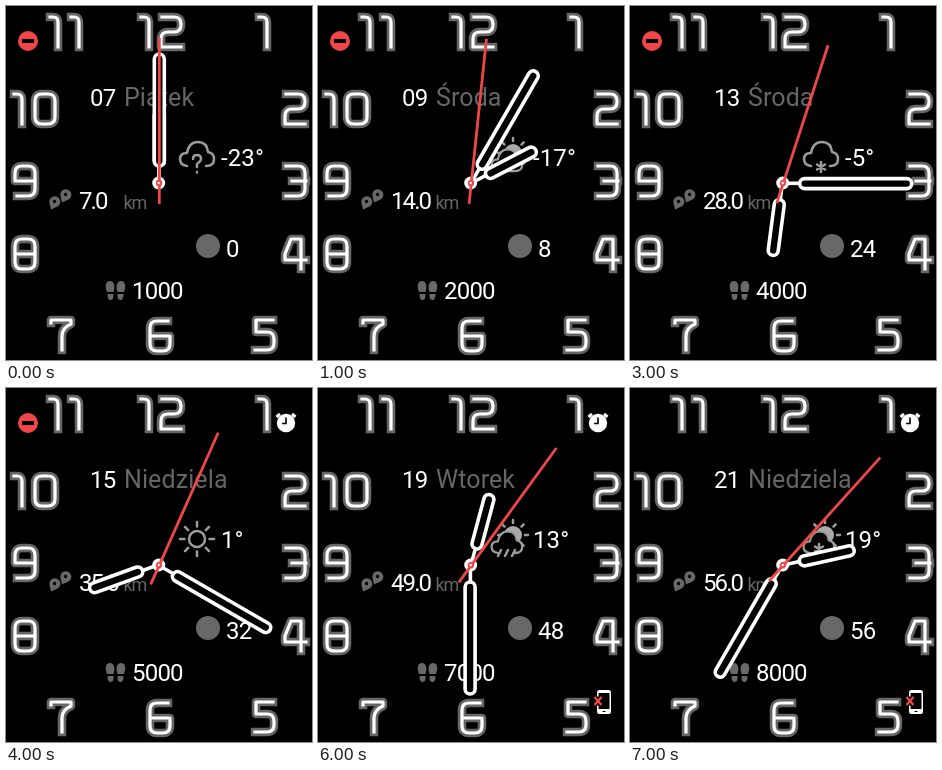
These frames come from a looping animation (306 px wide and 354 px high, 8000 ms). An HTML page:

```html
<!DOCTYPE html>
<html lang="pl">
<head>
<meta charset="utf-8">
<title>Tarcza zegarka</title>
<style>
html, body { margin: 0; width: 100%; height: 100%; overflow: hidden; background: #000; }
svg { display: block; width: 306px; height: 354px; }
text { font-family: Roboto, sans-serif; font-size: 24px; letter-spacing: -.8px; fill: #fff; }
.dim { fill: #666; font-size: 25px; letter-spacing: .1px; }
.line { fill: none; stroke: #9c9c9c; stroke-width: 2.5; stroke-linecap: round; stroke-linejoin: round; }
.hand { fill: #000; stroke: #fff; stroke-width: 3.6; }
</style>
</head>
<body>
<svg viewBox="0 0 306 354">
  <rect width="306" height="354"/>
  <g id="dial" fill="none" stroke-linejoin="round"></g>

  <text id="date" x="84" y="100"></text>
  <text id="day" class="dim" x="118" y="100"></text>
  <g id="sky"></g>
  <text id="temp" x="215" y="160" style="letter-spacing:.1px"></text>
  <text id="dist" x="73" y="203" style="letter-spacing:-1.9px"></text>
  <text class="dim" x="117.5" y="203" style="font-size:18px;letter-spacing:-1.2px">km</text>
  <text id="score" x="220" y="251"></text>
  <text id="steps" x="126" y="293"></text>

  <g fill="#686868">
    <path id="pin" fill-rule="evenodd" d="M56 196.500L54.500 190A5.500 5.500 0 1 1 62.500 193.500ZM59.500 186.800a1.700 1.700 0 1 0 .1 0Z"/>
    <use href="#pin" x="-11" y="7"/>
    <circle cx="202" cy="240" r="12"/>
    <path id="foot" d="M104 275C109 275 109 282 107.500 286H101C99 281 99 275 104 275ZM101.500 288H107.500V291Q107 294 104.500 294Q101.500 294 101.500 288Z"/>
    <use href="#foot" transform="matrix(-1 0 0 1 219 0)"/>
  </g>

  <g id="mute">
    <circle cx="22" cy="35" r="10" fill="#ef4747"/>
    <path d="M16 35H28" stroke="#000" stroke-width="4"/>
  </g>
  <g id="alarm">
    <path d="M270.500 29L274 26M289.500 29L286 26" stroke="#fff" stroke-width="3"/>
    <circle cx="280" cy="35" r="9.200" fill="#fff"/>
    <path d="M280 29.500V35.500H276" fill="none" stroke="#000" stroke-width="1.600"/>
  </g>
  <g id="phone">
    <rect x="279" y="302" width="14" height="24" rx="2.500" fill="#fff"/>
    <path d="M280.500 305H291.500V321H280.500Z"/>
    <path d="M284.500 323.500H287.500" stroke="#000"/>
    <path id="cross" d="M276.500 309L283.500 317M283.500 309L276.500 317" stroke="#000" stroke-width="5"/>
    <path d="M276.500 309L283.500 317M283.500 309L276.500 317" stroke="#ef4747" stroke-width="2.400"/>
  </g>

  <g id="hour"><path class="hand" d="M153 177V160"/><rect class="hand" x="148.300" y="104" width="10" height="56" rx="5"/></g>
  <g id="minute"><path class="hand" d="M153 177V160"/><rect class="hand" x="148.300" y="48" width="10" height="112" rx="5"/></g>
  <circle cx="152.700" cy="177" r="6.500" fill="#fff"/>
  <g id="second">
    <path d="M153.300 198V32" stroke="#ef4747" stroke-width="2.800"/>
    <circle cx="153" cy="177" r="3.200" fill="#ef4747"/>
  </g>
  <circle cx="152.700" cy="177" r="1.200" fill="#fff"/>
</svg>
<script>
const $ = id => document.getElementById(id);

// Numerals as centre lines in a 20 x 30 cell
const ring = 'M7 0H13Q20 0 20 7V23Q20 30 13 30H7Q0 30 0 23V7Q0 0 7 0Z';
const glyph = {
  0: ring,
  1: 'M0 0H3Q8 0 8 5V30',
  2: 'M1 0H13Q20 0 20 7V8Q20 15 13 15H7Q0 15 0 22V30H20',
  3: 'M1 0H13Q20 0 20 7V23Q20 30 13 30H1M7 15H21',
  4: 'M16 30V0H6L0 15V21H21',
  5: 'M19 0H2V12H13Q20 12 20 19V23Q20 30 13 30H1',
  6: 'M18 0H7Q0 0 0 7V23Q0 30 7 30H13Q20 30 20 23V15H0',
  7: 'M0 3V0H20V4Q11 8 11 16V30',
  8: ring + 'M0 15H20',
  9: 'M2 30H13Q20 30 20 23V7Q20 0 13 0H7Q0 0 0 7V15H20'
};
const places = [
  [1, 44, 11], [1, 65, 11], [1, 135, 11], [2, 155, 11], [1, 253, 11],
  [1, 8, 88], [0, 29, 88], [2, 279, 88], [9, 9, 160], [3, 279, 160],
  [8, 9, 233], [4, 279, 233], [7, 45, 314], [6, 144, 315], [5, 248, 314]
];
const stroke = (n, color, width) =>
  `<path d="${glyph[n]}" stroke="${color}" stroke-width="${width}" stroke-linecap="square"/>`;
$('dial').innerHTML = places.map(([n, x, y]) =>
  `<g transform="translate(${x} ${y})">${stroke(n, '#666', 8.5)}${stroke(n, '#fff', 3.2)}</g>`).join('');

// Weather symbols
const line = (d, extra = '') => `<path class="line" d="${d}" ${extra}/>`;
const puff = 'M181 160Q174 159 174 153Q174 147 181 147Q183 136 192 136Q201 136 202 146Q208 147 208 153Q208 160 200 160';
const rays = (x, y, a, b) => {
  let d = '';
  for (let i = 0; i < 8; i++) {
    const c = Math.cos(i * Math.PI / 4), s = Math.sin(i * Math.PI / 4);
    d += `M${x + a * c} ${y + a * s}L${x + b * c} ${y + b * s}`;
  }
  return line(d);
};
const flake = (x, y) => line(`M${x} ${y - 5}V${y + 5}M${x - 4} ${y - 2.5}L${x + 4} ${y + 2.5}M${x + 4} ${y - 2.5}L${x - 4} ${y + 2.5}`);
const rain = line('M183 162L180 168M190 162L187 168M197 162L194 168');
const sunCloud = end => '<circle cx="195" cy="147" r="9" fill="#aaa"/>' + rays(195, 147, 12, 15) +
  `<g transform="translate(17 21) scale(.9)">${line(puff + end, 'style="fill:#000"')}</g>`;
const sky = [
  line(puff) + line('M187 153Q187 149 191 149Q195 149 195 153Q195 155 191 158V161M191 166V166.5'),
  sunCloud('Z'),
  line(puff) + rain,
  line(puff) + flake(191, 161),
  '<circle class="line" cx="191" cy="151" r="8"/>' + rays(191, 151, 12.5, 17),
  `<path d="${puff}Z" fill="#888"/><g transform="translate(0 4)">${line('M181 160Q174 159 174 153Q174 148 180 148Q183 141 189 144Q194 146 195 149Q208 145 208 154Q208 160 200 160Z', 'style="fill:#222"')}</g>`,
  sunCloud('') + rain,
  sunCloud('') + flake(189, 161)
];

const days = ['Piątek', 'Środa', 'Piątek', 'Środa', 'Niedziela', 'Piątek', 'Wtorek', 'Niedziela'];
const turn = (id, deg) => $(id).setAttribute('transform', `rotate(${deg} 152.7 177)`);
const show = (id, on) => $(id).setAttribute('visibility', on ? 'visible' : 'hidden');
let last = -1;

function draw(ms) {
  const k = Math.floor(ms % 8000 / 1000);
  if (k === last) return;
  last = k;
  const values = {
    date: String(7 + 2 * k).padStart(2, '0'),
    day: days[k],
    temp: -23 + 6 * k + '°',
    dist: (7 * (k + 1)).toFixed(1),
    score: 8 * k,
    steps: 1000 * (k + 1)
  };
  for (const id in values) $(id).textContent = values[id];
  $('sky').innerHTML = sky[k];
  turn('hour', 62.5 * k);
  turn('minute', 30 * k);
  turn('second', 6 * k);
  show('mute', k < 5);
  show('alarm', k > 3);
  show('phone', k > 4);
}

const start = performance.now();
function tick(now) {
  draw(Math.max(0, now - start));
  requestAnimationFrame(tick);
}
draw(0);
requestAnimationFrame(tick);
</script>
</body>
</html>
```
